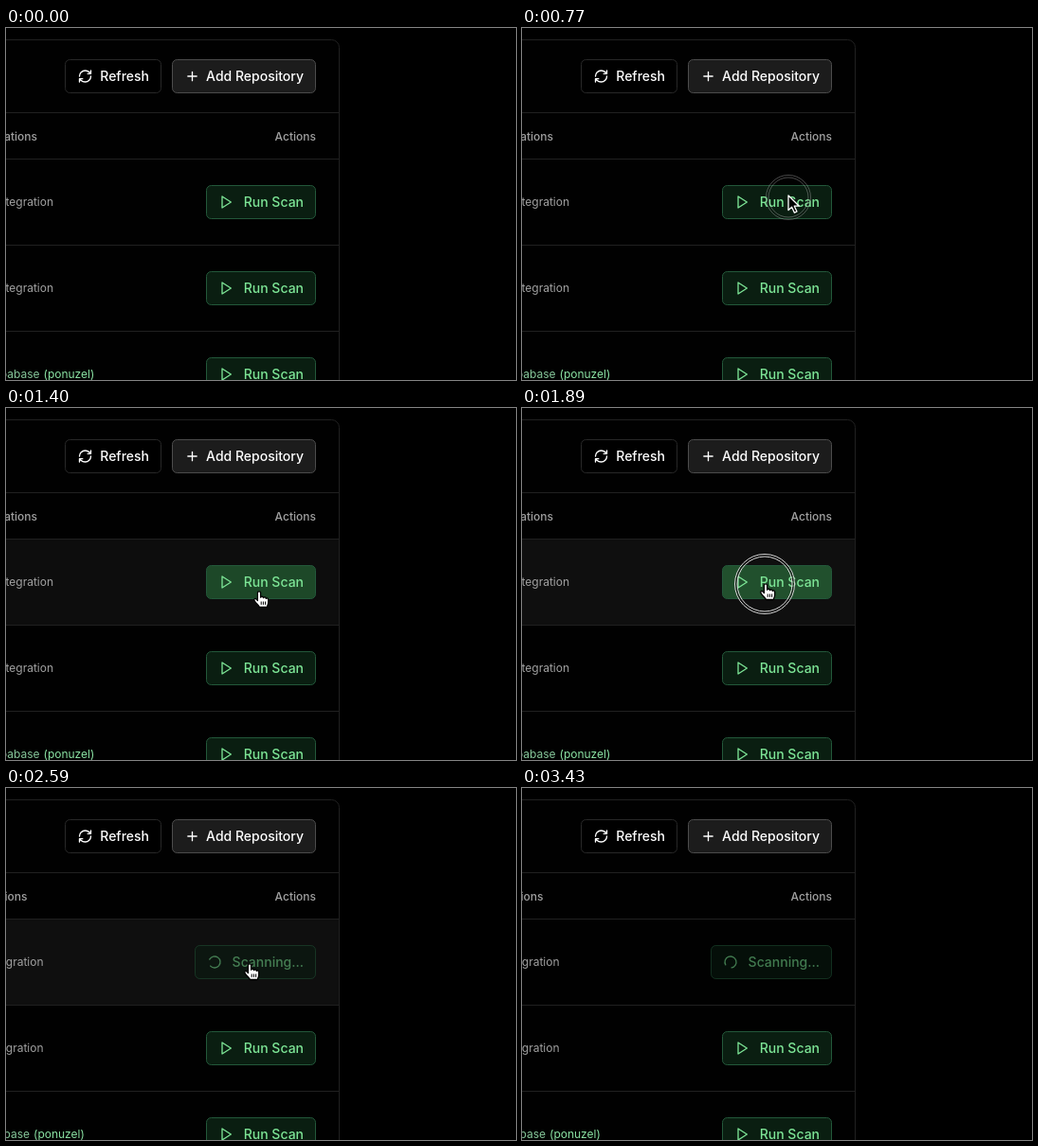
These frames come from a looping animation (538 by 372 pixels, 3500 ms). An HTML page with a canvas:

```html
<!DOCTYPE html>
<html lang="en">
<head>
<meta charset="utf-8">
<style>
  html, body { margin: 0; width: 100%; height: 100%; overflow: hidden; background: #000; }
  canvas { display: block; }
</style>
</head>
<body>
<canvas id="stage" width="538" height="372"></canvas>
<script>
const c = document.getElementById('stage').getContext('2d');
const LOOP = 3500, STEP = 70;
const HOVER_FROM = 1260, SCAN_START = 2010;
const GREEN = '#7de596', LINE = '#202020';

// Icons on a 24 unit grid
const icons = {
  refresh: 'M3 12a9 9 0 0 1 9-9 9.75 9.75 0 0 1 6.74 2.74L21 8M21 3v5h-5M21 12a9 9 0 0 1-9 9 9.75 9.75 0 0 1-6.74-2.74L3 16M8 16H3v5',
  plus: 'M5 12h14M12 5v14',
  play: 'M6 3L20 12L6 21Z',
  spinner: 'M21 12a9 9 0 1 1-6.219-8.56'
};
for (const name in icons) icons[name] = new Path2D(icons[name]);

// Pointer shapes, hot spot at the origin
const arrow = new Path2D('M0 0V15.5L3.6 12.2L6.4 18.2L9 17L6.3 11.2H11.3Z');
const hand = new Path2D('M-1.6 1.4a1.6 1.6 0 0 1 3.2 0V6.2a1.5 1.5 0 0 1 2.9.5a1.5 1.5 0 0 1 2.8.7a1.4 1.4 0 0 1 2.4 1V11.5C9.7 14 8.6 14.5 8.3 16.5H.4C0 15-2.6 13-4.8 9.8c-1.4-2 .8-3 2-1.7l1.2 1.4Z');
const knuckles = new Path2D('M2.2 10.5v3.4M4.4 10.5v3.4M6.6 10.5v3.4');

// Pointer path: time, x, y
const path = [
  [280, 286, 331], [350, 288, 285], [420, 287, 232], [490, 285, 194],
  [560, 282, 170], [630, 281, 177], [1190, 281, 177], [1260, 279, 181],
  [1330, 274, 190], [1400, 267, 194], [1470, 261, 192], [1540, 258, 189],
  [1610, 257, 186], [2590, 257, 186], [2660, 258, 200], [2730, 262, 240],
  [2800, 268, 292], [2870, 273, 335], [2940, 275, 352], [3010, 275, 352],
  [3080, 277, 365], [3150, 278, 395]
];

function pointer(t) {
  const i = path.findIndex(p => p[0] > t);
  if (i === 0) return null;
  if (i < 0) return path[path.length - 1].slice(1);
  const [a, b] = [path[i - 1], path[i]];
  const k = (t - a[0]) / (b[0] - a[0]);
  return [a[1] + (b[1] - a[1]) * k, a[2] + (b[2] - a[2]) * k];
}

const rowTop = i => 138 + 91 * i;

function overRow(i, t) {
  if (t < HOVER_FROM) return false;
  const y = pointer(t)[1];
  return y < 372 && y >= rowTop(i) && y < rowTop(i + 1);
}

function overButton(i, t) {
  return overRow(i, t) && Math.abs(pointer(t)[1] - rowTop(i) - 46) < 18;
}

// Averaging the last 150 ms gives the hover transition
function fade(test, i, t) {
  let sum = 0;
  for (let k = 0; k < 6; k++) sum += test(i, t - k * 30);
  return sum / 6;
}

function text(str, x, y, color, size = 14, weight = 500, align = 'left') {
  c.font = `${weight} ${size}px Inter, sans-serif`;
  c.textAlign = align;
  c.fillStyle = color;
  c.fillText(str, x, y);
}

function box(x, y, w, h, r, fill, stroke) {
  c.beginPath();
  c.roundRect(x + .5, y + .5, w - 1, h - 1, r);
  c.fillStyle = fill;
  c.fill();
  c.strokeStyle = stroke;
  c.lineWidth = 1;
  c.stroke();
}

function icon(name, x, y, color, angle = 0) {
  c.save();
  c.translate(x, y);
  c.rotate(angle);
  c.scale(2 / 3, 2 / 3);
  c.translate(-12, -12);
  c.strokeStyle = color;
  c.lineWidth = 2;
  c.lineCap = c.lineJoin = 'round';
  c.stroke(icons[name]);
  c.restore();
}

function rule(y) {
  c.fillStyle = LINE;
  c.fillRect(0, y, 351, 1);
}

function row(i, t, shift) {
  const top = rowTop(i), mid = top + 46;
  const scanning = i === 0 && t >= SCAN_START;
  c.fillStyle = `rgba(255,255,255,${.055 * fade(overRow, i, t)})`;
  c.fillRect(0, top + 1, 351, 90);
  if (i < 2) {
    text('Integration', 50 - shift, mid + 4, '#a1a1a1', 12, 400, 'right');
  } else {
    text('Supabase', 35.5 - shift, mid + 4, '#86c79a', 12, 400, 'right');
    text('(ponuzel)', 39.5 - shift, mid + 4, '#8be3a4', 12, 400);
  }
  if (scanning) {
    c.globalAlpha = .5;
    box(199, mid - 18, 128, 36, 5, '#0a1f12', '#23583a');
    icon('spinner', 220, mid, GREEN, (t - SCAN_START) / 1000 * 2 * Math.PI);
    text('Scanning...', 314, mid + 5, GREEN, 14, 500, 'right');
    c.globalAlpha = 1;
  } else {
    const k = fade(overButton, i, t);
    const mix = (a, b) => Math.round(a + (b - a) * k);
    box(211, mid - 18, 116, 36, 5, `rgb(${mix(10, 33)},${mix(30, 80)},${mix(17, 45)})`, '#23583a');
    icon('play', 232, mid, GREEN);
    text('Run Scan', 314, mid + 5, GREEN, 14, 500, 'right');
  }
  rule(top);
}

function circle(x, y, r, width, color) {
  c.beginPath();
  c.arc(x, y, r, 0, 2 * Math.PI);
  c.lineWidth = width;
  c.strokeStyle = color;
  c.stroke();
}

function ring(x, y, r, alpha) {
  c.globalAlpha = alpha;
  circle(x, y, r - 1.5, 2, 'rgba(0,0,0,.6)');
  circle(x, y, r - .5, 1, '#d8d8d8');
  circle(x, y, r - 3, 1, '#d8d8d8');
  c.globalAlpha = 1;
}

function drawPointer(t) {
  const p = pointer(t);
  if (!p) return;
  const [x, y] = p;
  if (t >= 770 && t < 1050) ring(x, y + 2, 24, Math.min(1, (t - 700) / 210));
  if (t >= 1890 && t < 2170) ring(x - 1, y, 32 - Math.min(8, (t - 1890) / 210 * 8), 1);
  const pointing = [0, 1, 2].some(i => overButton(i, t));
  c.save();
  c.translate(x, y);
  c.lineJoin = 'round';
  c.lineWidth = 1.3;
  c.fillStyle = pointing ? '#fff' : '#000';
  c.strokeStyle = pointing ? '#000' : '#fff';
  c.fill(pointing ? hand : arrow);
  c.stroke(pointing ? hand : arrow);
  if (pointing) {
    c.lineWidth = 1;
    c.stroke(knuckles);
  }
  c.restore();
}

function draw(t) {
  const shift = t >= SCAN_START ? 10.5 : 0;
  c.fillStyle = '#000';
  c.fillRect(0, 0, 538, 372);
  box(-20, 12, 372, 400, 8, '#010101', LINE);

  box(62, 33, 102, 36, 5, '#000', '#282828');
  icon('refresh', 83.5, 51, '#fff');
  text('Refresh', 151, 56, '#fff', 14, 500, 'right');
  box(175, 33, 152, 36, 5, '#1c1c1c', '#4c4c4c');
  icon('plus', 196.5, 51, '#fff');
  text('Add Repository', 314, 56, '#fff', 14, 500, 'right');

  rule(89);
  text('Integrations', 33 - shift, 118.5, '#a1a1a1', 12, 500, 'right');
  text('Actions', 327, 118.5, '#a1a1a1', 12, 500, 'right');
  for (let i = 0; i < 3; i++) row(i, t, shift);
  drawPointer(t);
}

const start = performance.now();
function tick() {
  const t = (performance.now() - start) % LOOP;
  draw(Math.floor(t / STEP) * STEP);
  requestAnimationFrame(tick);
}
tick();
</script>
</body>
</html>
```
